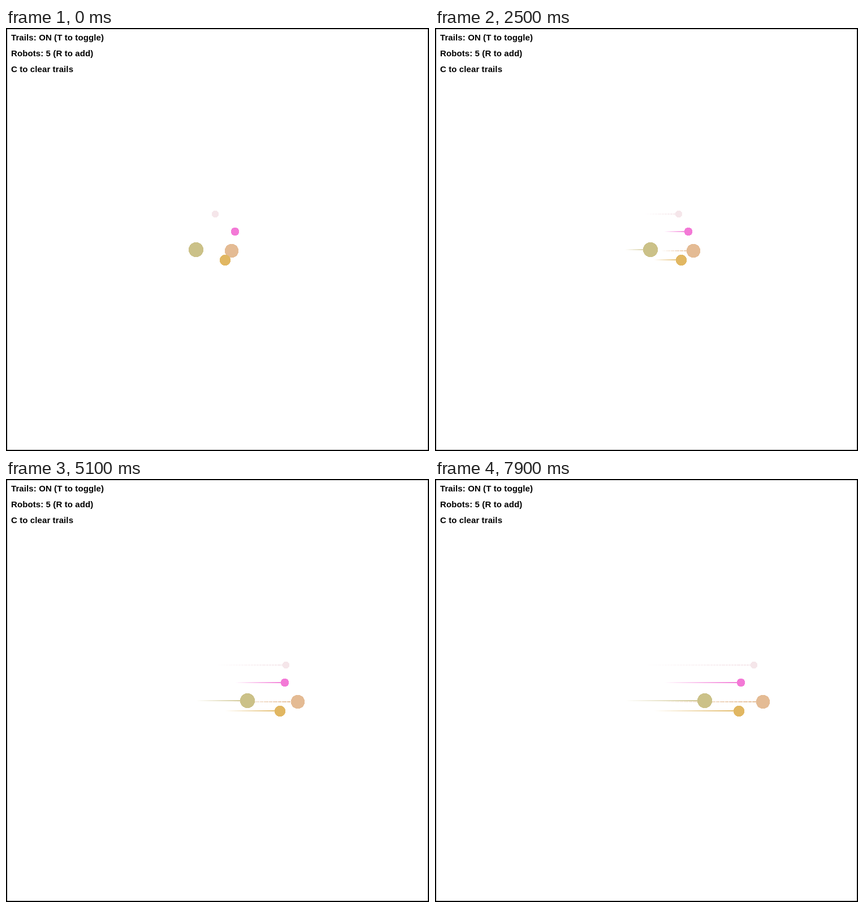
These frames come from a looping animation (748x748 px, 8 s). An HTML page with a canvas:

```html
<!DOCTYPE html>
<html lang="en">
<head>
<meta charset="utf-8">
<title>Robot trails</title>
<style>
  html, body { margin: 0; width: 100%; height: 100%; overflow: hidden; background: #fff; }
  canvas, svg { position: absolute; left: 0; top: 0; width: 748px; height: 748px; }
  text { font: bold 15px "Liberation Sans", Arial, sans-serif; letter-spacing: .1px; }
</style>
</head>
<body>
<canvas id="stage" width="748" height="748"></canvas>
<svg viewBox="0 0 748 748">
  <rect x="1" y="1" width="746" height="746" fill="none" stroke="#000" stroke-width="2"/>
  <text x="9" y="22">Trails: ON (T to toggle)</text>
  <text x="9" y="50">Robots: 5 (R to add)</text>
  <text x="9" y="78">C to clear trails</text>
</svg>
<script>
const STEP = 100, LOOP = 8000;
const ctx = document.getElementById('stage').getContext('2d');

// x: start, v: pixels per step, shift: half-pixel centre for odd diameters
const robots = [
  { x: 336.9, v: 1.785, y: 392, r: 13, shift: 0, color: '#cbc188' },
  { x: 399.9, v: 2.285, y: 394, r: 12, shift: 0, color: '#e4bb94' },
  { x: 387.6, v: 1.9, y: 410, r: 9.5, shift: .5, color: '#e1b762' },
  { x: 405.9, v: 1.716, y: 360, r: 7, shift: 0, color: '#f379d6' },
  { x: 370.5, v: 2.456, y: 329, r: 6, shift: 0, color: '#f5e6ea' }
];

const xAt = (bot, step) => Math.floor(bot.x + bot.v * step);

// Older dots are fainter; each dot replaces what lies under it in its own trail.
function drawTrail(bot, step) {
  ctx.fillStyle = bot.color;
  for (let i = 0; i < step; i++) {
    const left = xAt(bot, i) - 1;
    const width = Math.min(2, xAt(bot, i + 1) - 1 - left);
    ctx.globalAlpha = i / step;
    ctx.fillRect(left, bot.y - 1, width, 2);
  }
  ctx.globalAlpha = 1;
}

// Hard-edged disc, one pixel row at a time
function drawDisc(bot, step) {
  const cx = xAt(bot, step) + bot.shift, cy = bot.y + bot.shift;
  const reach = bot.r + .15;
  ctx.fillStyle = bot.color;
  for (let row = cy - bot.r; row < cy + bot.r; row++) {
    const half = Math.sqrt(reach ** 2 - (row + .5 - cy) ** 2);
    const left = Math.ceil(cx - half - .5);
    const right = Math.floor(cx + half + .5);
    ctx.fillRect(left, row, right - left, 1);
  }
}

function draw(step) {
  ctx.clearRect(0, 0, 748, 748);
  for (const bot of robots) drawTrail(bot, step);
  for (const bot of [robots[1], robots[0], ...robots.slice(2)]) drawDisc(bot, step);
}

const start = performance.now();
let shown = -1;
function tick() {
  const step = Math.floor((performance.now() - start) % LOOP / STEP);
  if (step !== shown) draw(shown = step);
  requestAnimationFrame(tick);
}
tick();
</script>
</body>
</html>
```
